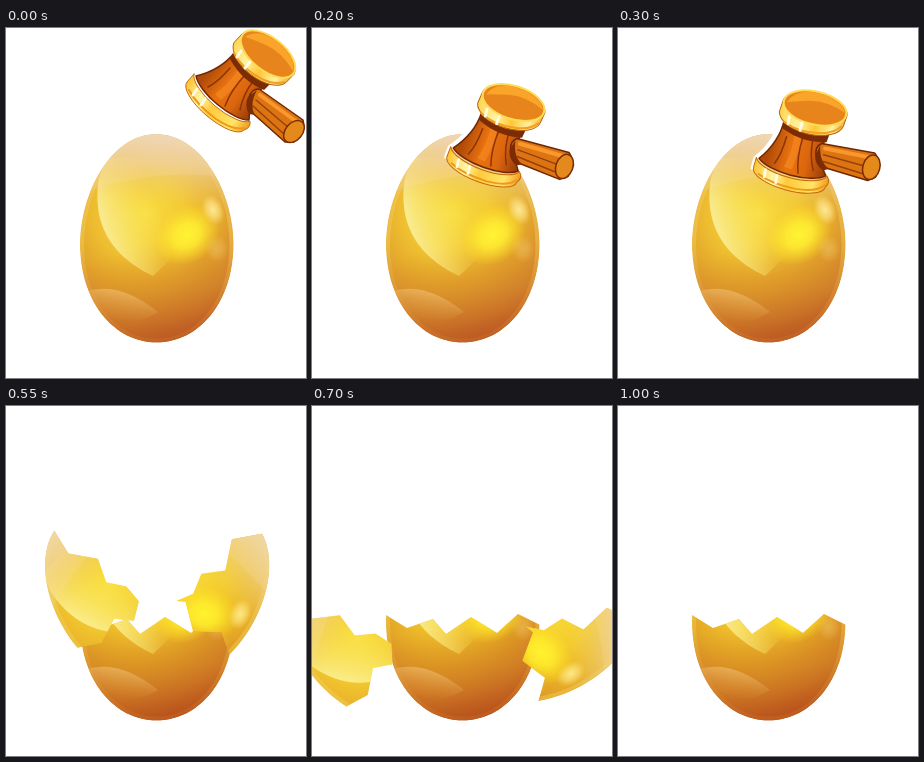
An HTML page for the animation above (1.15 s loop, 300 px wide and 350 px high).

```html
<!DOCTYPE html>
<html lang="en">
<head>
<meta charset="utf-8">
<title>Golden egg</title>
<style>
html, body { margin: 0; width: 100%; height: 100%; overflow: hidden; background: #fff; }
svg { display: block; width: 300px; height: 350px; }
</style>
</head>
<body>
<svg viewBox="0 0 300 350">
  <defs>
    <radialGradient id="base" gradientUnits="userSpaceOnUse" cx="140" cy="185" r="132">
      <stop offset="0" stop-color="#f8dc3c"/>
      <stop offset=".3" stop-color="#f2c62c"/>
      <stop offset=".56" stop-color="#e3a526"/>
      <stop offset=".8" stop-color="#d4842a"/>
      <stop offset="1" stop-color="#b9521c"/>
    </radialGradient>
    <linearGradient id="low" gradientUnits="userSpaceOnUse" x1="138" y1="216" x2="164" y2="314">
      <stop offset="0" stop-color="#d4801c" stop-opacity="0"/>
      <stop offset=".55" stop-color="#cc7420" stop-opacity=".5"/>
      <stop offset="1" stop-color="#b64e1c" stop-opacity=".9"/>
    </linearGradient>
    <linearGradient id="top" gradientUnits="userSpaceOnUse" x1="154" y1="106" x2="146" y2="176">
      <stop offset="0" stop-color="#ecd4bc"/>
      <stop offset=".4" stop-color="#eed2a0" stop-opacity=".75"/>
      <stop offset="1" stop-color="#f0d070" stop-opacity="0"/>
    </linearGradient>
    <linearGradient id="shine" gradientUnits="userSpaceOnUse" x1="100" y1="208" x2="156" y2="190">
      <stop offset="0" stop-color="#fbf3a4" stop-opacity=".85"/>
      <stop offset=".45" stop-color="#fbee7c" stop-opacity=".5"/>
      <stop offset="1" stop-color="#fbe650" stop-opacity="0"/>
    </linearGradient>
    <linearGradient id="foot" gradientUnits="userSpaceOnUse" x1="118" y1="260" x2="112" y2="292">
      <stop offset="0" stop-color="#f4cc84" stop-opacity=".6"/>
      <stop offset="1" stop-color="#e09840" stop-opacity="0"/>
    </linearGradient>
    <linearGradient id="edge" gradientUnits="userSpaceOnUse" x1="150" y1="120" x2="150" y2="305">
      <stop offset="0" stop-color="#f0d8a0" stop-opacity=".2"/>
      <stop offset=".5" stop-color="#f4cc58" stop-opacity=".45"/>
      <stop offset="1" stop-color="#d88830" stop-opacity=".2"/>
    </linearGradient>
    <radialGradient id="glow">
      <stop offset="0" stop-color="#fff42c"/>
      <stop offset=".4" stop-color="#ffee2c" stop-opacity=".85"/>
      <stop offset="1" stop-color="#ffe020" stop-opacity="0"/>
    </radialGradient>
    <radialGradient id="spot">
      <stop offset="0" stop-color="#fff0a0" stop-opacity=".9"/>
      <stop offset=".5" stop-color="#ffe890" stop-opacity=".6"/>
      <stop offset="1" stop-color="#ffe070" stop-opacity="0"/>
    </radialGradient>
    <linearGradient id="gold" gradientUnits="userSpaceOnUse" x1="182" y1="56" x2="242" y2="100">
      <stop offset="0" stop-color="#ffc63a"/>
      <stop offset=".25" stop-color="#fff6a8"/>
      <stop offset=".45" stop-color="#ffca3c"/>
      <stop offset=".8" stop-color="#ffe468"/>
      <stop offset="1" stop-color="#f39a1c"/>
    </linearGradient>
    <linearGradient id="rim" gradientUnits="userSpaceOnUse" x1="228" y1="15" x2="284" y2="54">
      <stop offset="0" stop-color="#ffd450"/>
      <stop offset=".3" stop-color="#fff3a0"/>
      <stop offset=".55" stop-color="#ffc636"/>
      <stop offset=".8" stop-color="#fff0a0"/>
      <stop offset="1" stop-color="#f6a820"/>
    </linearGradient>
    <linearGradient id="wood" gradientUnits="userSpaceOnUse" x1="204" y1="42" x2="252" y2="80">
      <stop offset="0" stop-color="#b04a08"/>
      <stop offset=".35" stop-color="#e8720f"/>
      <stop offset=".65" stop-color="#dc660e"/>
      <stop offset="1" stop-color="#963a08"/>
    </linearGradient>

    <path id="shell" d="M150 106C196 106 227.500 165 227.500 216C227.500 273 194 314.500 150.500 314.500C107 314.500 74 273 74 216C74 165 105 106 150 106Z"/>
    <clipPath id="inside"><use href="#shell"/></clipPath>
    <clipPath id="leftCut"><polygon id="leftEdge"/></clipPath>
    <clipPath id="rightCut"><polygon id="rightEdge"/></clipPath>
    <clipPath id="bowlCut"><polygon id="bowlEdge"/></clipPath>

    <g id="egg" clip-path="url(#inside)">
      <use href="#shell" fill="url(#base)"/>
      <use href="#shell" fill="url(#low)"/>
      <path d="M93 150C88 180 92 222 147 248L166 230V130H100Z" fill="url(#shine)"/>
      <use href="#shell" fill="url(#top)"/>
      <path d="M70 168Q145 138 222 150V100H70Z" fill="#f4dcc0" opacity=".16"/>
      <path d="M78 264Q112 252 152 284Q126 300 94 292Z" fill="url(#foot)"/>
      <ellipse cx="181" cy="207" rx="35" ry="28" transform="rotate(-35 181 207)" fill="url(#glow)"/>
      <ellipse cx="207" cy="182" rx="11" ry="16" transform="rotate(-25 207 182)" fill="url(#spot)"/>
      <ellipse cx="211" cy="221" rx="12" ry="14" fill="url(#spot)" opacity=".3"/>
      <use href="#shell" fill="none" stroke="url(#edge)" stroke-width="8"/>
    </g>
  </defs>

  <g id="whole">
    <use href="#egg"/>
    <use id="wash" href="#shell" fill="#eee0a0" opacity=".05"/>
    <polygon id="crack" fill="#fff"/>
  </g>

  <g id="broken">
    <use href="#egg" clip-path="url(#bowlCut)"/>
    <g id="left"><g clip-path="url(#leftCut)">
      <use href="#egg"/><use href="#shell" fill="#ffec48" opacity=".12"/>
    </g></g>
    <g id="right"><g clip-path="url(#rightCut)">
      <use href="#egg"/><use href="#shell" fill="#ffe02c" opacity=".12"/>
    </g></g>
  </g>

  <g id="hammer" stroke-linejoin="round" stroke-linecap="round">
    <path d="M226 20Q214 40 187 46L180 54" fill="none" stroke="#fff" stroke-width="4"/>
    <path d="M229 24Q215 42 190 48A37 13 40 0 0 243 92Q243 72 262 54Z" fill="url(#wood)" stroke="#6e2604" stroke-width="1.500"/>
    <path d="M224 40Q212 54 202 59M239 47Q225 62 219 78M248 52Q237 66 234 82" fill="none" stroke="#8c3406" stroke-width="1.500"/>
    <path d="M232 42Q222 57 209 66L215 72Q230 59 238 45Z" fill="#f98c24" opacity=".6"/>
    <path d="M227 26Q240 50 264 56L258 62Q236 53 224 31Z" fill="#7c2c04"/>
    <path d="M188 46L181 54A37 13 40 0 0 238 102Q245 100 244 93A37 13 40 0 1 188 46Z" fill="url(#gold)" stroke="#c46a0c"/>
    <path d="M183 62Q190 76 210 91Q228 103 238 100" fill="none" stroke="#ef9918" stroke-width="2"/>
    <path d="M191 61L187 67M199 71L195 77" stroke="#fffbe0" stroke-width="3"/>
    <path d="M236 6L228 14.500A33 17 38 0 0 280 54.500L288 46.300A33 17 38 0 0 236 6Z" fill="url(#rim)" stroke="#b8640c"/>
    <path d="M228 25Q236 41 256 51Q268 57 278 54" fill="none" stroke="#f2a024" stroke-width="2"/>
    <ellipse cx="262" cy="26" rx="32" ry="16.500" transform="rotate(38 262 26)" fill="#e8841c" stroke="#ffdc58" stroke-width="2"/>
    <path d="M239 9Q256 -2 278 20Q290 34 287 43Q276 24 260 17Q246 11 239 9Z" fill="#faa52a"/>
    <path d="M235 23L231 29M244 34L239 40" stroke="#fffbe0" stroke-width="3"/>
    <path d="M243 70Q245 61 253 61L297 92Q300 103 288 114L279 114L242 81Z" fill="#dd7412" stroke="#6e2604" stroke-width="1.500"/>
    <path d="M254 67L291 94" stroke="#f9982c" stroke-width="4"/>
    <path d="M250 72L283 100M247 78L279 107" stroke="#96400a" stroke-width="1.500"/>
    <path d="M242 69Q238 77 243 86L249 87Q243 77 251 62Z" fill="#7c2c04"/>
    <ellipse cx="288" cy="103.500" rx="12.500" ry="8.500" transform="rotate(-50 288 103.500)" fill="#e48a1c" stroke="#7c2c04" stroke-width="1.500"/>
  </g>
</svg>
<script>
const $ = id => document.getElementById(id);
const LOOP = 1150;

// Crack sides run from the top to the shared tip; the rim runs left to right.
const crackL = [[138,104],[132,134],[150,158],[140,181],[152,198],[151,217]];
const crackR = [[169,106],[149,134],[166,161],[151,180],[159,200],[152,217]];
const rim = [[74,209],[95,222],[121,213],[134,228],[159,211],[185,227],[206,208],[228,219]];
const setPoints = (id, pts) => $(id).setAttribute("points", pts.join(" "));

setPoints("crack", [...crackL, ...crackR.slice().reverse()]);
setPoints("leftEdge", [...crackL, ...rim.slice(0, 4).reverse(), [60,209], [60,90], [138,90]]);
setPoints("rightEdge", [...crackR, ...rim.slice(4), [240,219], [240,90], [169,90]]);
setPoints("bowlEdge", [...rim, [240,219], [240,330], [60,330], [60,209]]);

// Each pose: start time, x, y, angle. Poses hold until the next one.
const swing = [[0,262,26,0], [100,232,50,-10], [200,201.5,74.5,-20], [300,197,80,-25]];
const fallL = [[550,95.9,188.1,-43], [700,42,242,-60], [850,22,326,-77]];
const fallR = [[550,211.1,175.1,44], [700,258.7,227.5,79], [850,280,322,101]];

const poseAt = (poses, t) => poses.filter(p => p[0] <= t).pop() || poses[0];
const show = (id, on) => $(id).setAttribute("visibility", on ? "visible" : "hidden");

function place(id, poses, t, pivotX, pivotY) {
  const [, x, y, angle] = poseAt(poses, t);
  $(id).setAttribute("transform",
    `translate(${x} ${y}) rotate(${angle}) translate(${-pivotX} ${-pivotY})`);
}

function draw(t) {
  show("hammer", t < 400);
  show("whole", t < 550);
  show("wash", t < 400);
  show("crack", t >= 400 && t < 550);
  show("broken", t >= 550);
  show("left", t >= 550 && t < 1000);
  show("right", t >= 550 && t < 1000);
  place("hammer", swing, t, 262, 26);
  place("left", fallL, t, 128.8, 186.6);
  place("right", fallR, t, 167.4, 174.3);
}

const start = performance.now();
function tick() {
  draw((performance.now() - start) % LOOP);
  requestAnimationFrame(tick);
}
tick();
</script>
</body>
</html>
```
